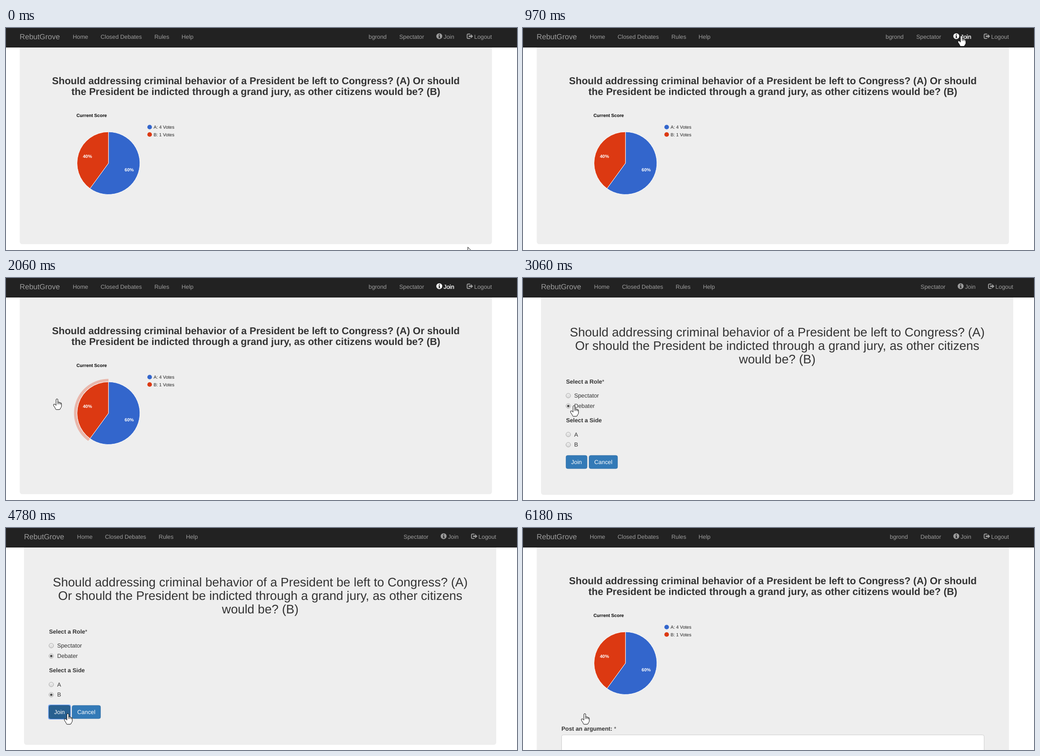
These frames come from a looping animation (1133 px wide and 494 px high, 7.11 s). An HTML page:

```html
<!DOCTYPE html>
<html lang="en">
<head>
<meta charset="utf-8">
<title>Debate</title>
<style>
  html, body { margin: 0; width: 100%; height: 100%; overflow: hidden; background: #fff; }
  svg { display: block; width: 100%; height: 100%; }
  text { font: 12.85px "Liberation Sans", Arial, sans-serif; fill: #333; text-rendering: geometricPrecision; }
  .bold { font-weight: bold; }
  .middle { text-anchor: middle; }
  .end { text-anchor: end; }
  #nav text { fill: #9d9d9d; }
  #nav .brand { font-size: 16.52px; }
  #join { color: #9d9d9d; }
  #join.lit { color: #fff; }
  #nav #join text { fill: currentColor; }
  #nav #join.lit text { stroke: #fff; stroke-width: .4px; }
  .question { font-size: 22.03px; font-weight: bold; }
  .prompt { font-size: 27.54px; }
  .chart text { font-size: 10.12px; fill: #222; }
  .chart .title { font-weight: bold; fill: #000; }
  .chart .share { font-weight: bold; fill: #fff; }
  .slice { stroke: #fff; stroke-width: 1; }
  .radio circle:first-child { fill: url(#shade); stroke: #a0a0a0; stroke-width: .9; }
  .radio.hover circle:first-child { stroke: #858585; }
  .radio .dot { fill: #4a4a4a; stroke: none; }
  .button { fill: #337ab7; stroke: #2e6da4; stroke-width: .92; }
  .caption { fill: #fff; text-anchor: middle; }
  #hand, #arrow { fill: #fff; stroke: #000; stroke-width: 1; stroke-linejoin: round; stroke-linecap: round; }
</style>
</head>
<body>
<svg viewBox="0 0 1133 494">
  <defs>
    <linearGradient id="shade" x2="0" y2="1">
      <stop stop-color="#f0f0f0"/><stop offset="1" stop-color="#d8d8d8"/>
    </linearGradient>
  </defs>
  <rect width="1133" height="494" fill="#fff"/>
  <rect id="panel" y="20" width="1047" rx="5.5" fill="#eee"/>
  <rect width="1133" height="43" fill="#222"/>
  <rect y="42.3" width="1133" height="1" fill="#080808"/>

  <g id="nav">
    <text class="brand" x="30.3" y="25.3">RebutGrove</text>
    <text x="148" y="24.1">Home</text>
    <text x="209.8" y="24.1">Closed Debates</text>
    <text x="329" y="24.1">Rules</text>
    <text x="389.3" y="24.1">Help</text>
    <text id="user" class="end" y="24.1">bgrond</text>
    <text id="role" class="end" x="927" y="24.1"></text>
    <g id="join">
      <circle cx="960.7" cy="18.2" r="6.5" fill="currentColor"/>
      <path d="M959.7 13.8h2.2v2h-2.2zM958.8 16.9h3.2v4h1v1.4h-4.2v-1.4h1v-2.6h-1z" fill="#222"/>
      <text x="970.3" y="24.1">Join</text>
    </g>
    <path d="M1029 13.5h-4.5q-2 0-2 2v5.8q0 2 2 2h4.5" fill="none" stroke="#9d9d9d" stroke-width="1.9"/>
    <path d="M1026 16.8h4.6v-3.2l5 4.8-5 4.8V20H1026z" fill="#9d9d9d"/>
    <text x="1038" y="24.1">Logout</text>
  </g>

  <g id="score">
    <text class="question middle" x="554" y="125">Should addressing criminal behavior of a President be left to Congress? (A) Or should</text>
    <text class="question middle" x="554" y="149">the President be indicted through a grand jury, as other citizens would be? (B)</text>
    <g class="chart">
      <text class="title" x="156.3" y="197.5">Current Score</text>
      <circle cx="318.5" cy="220.5" r="5.1" fill="#3366cc"/>
      <text x="327.2" y="224.2">A: 4 Votes</text>
      <circle cx="318.5" cy="237" r="5.1" fill="#dc3912"/>
      <text x="327.2" y="240.6">B: 1 Votes</text>
      <path id="glow" fill="none" stroke="#dc3912" stroke-opacity=".3" stroke-width="6"/>
      <path id="sliceA" class="slice" fill="#3366cc"/>
      <path id="sliceB" class="slice" fill="#dc3912"/>
      <text class="share middle" x="180.6" y="289.3">40%</text>
      <text class="share middle" x="273.2" y="319">60%</text>
    </g>
    <g id="post">
      <text x="85.3" y="450.6"><tspan class="bold">Post an argument:</tspan> *</text>
      <rect x="85.6" y="460.4" width="936.8" height="60" rx="3.7" fill="#fff" stroke="#ccc"/>
    </g>
  </g>

  <g id="form">
    <text class="prompt middle" x="563.7" y="130">Should addressing criminal behavior of a President be left to Congress? (A)</text>
    <text class="prompt middle" x="563.7" y="160">Or should the President be indicted through a grand jury, as other citizens</text>
    <text class="prompt middle" x="563.7" y="190">would be? (B)</text>
    <text x="95.4" y="234.6"><tspan class="bold">Select a Role</tspan>*</text>
    <text class="bold" x="95.4" y="321.3">Select a Side</text>
    <g id="options"></g>
    <rect id="ring" x="94.6" y="394.1" width="48" height="30.8" rx="3" fill="none" stroke="#6ba3f5" stroke-width="2.2"/>
    <rect id="submit" class="button" x="95.4" y="394.9" width="46.6" height="29.2" rx="3.5"/>
    <text class="caption" x="118.6" y="413.8">Join</text>
    <rect class="button" x="146.6" y="394.9" width="63" height="29.2" rx="3.5"/>
    <text class="caption" x="178.1" y="413.8">Cancel</text>
  </g>

  <path id="arrow" d="M0 0V16.5L3.8 13L6.3 18.8L9 17.6L6.5 12H11.5Z"/>
  <path id="hand" d="M-2 14V2Q-2 0 0 0T2 2V7.5Q3.6 6 5 8Q6.8 6.8 8 9Q10 8.4 10 11V16.5Q10 18.5 7.8 20.8Q7.4 23.8 5 23.8H-1.5Q-3 23.8-3.4 21.5Q-4.6 19-7 15.8Q-8.6 13-7 11.8Q-5 10.9-2 14M2 7.5V11.5M5 8V11.5M8 9.2V12"/>
</svg>

<script>
const LOOP = 7110, FORM_OPEN = 2130, FORM_SENT = 6010;
const $ = id => document.getElementById(id);
const show = (id, on) => { $(id).style.display = on ? '' : 'none'; };

const rim = (turn, r) => {
  const a = turn * 2 * Math.PI;
  return `${227.2 + r * Math.sin(a)} ${300.8 - r * Math.cos(a)}`;
};
const arc = (from, to, r) => `M${rim(from, r)}A${r} ${r} 0 ${+(to - from > .5)} 1 ${rim(to, r)}`;
const slice = (from, to) => arc(from, to, 69.7) + 'L227.2 300.8Z';
$('sliceA').setAttribute('d', slice(0, .6));
$('sliceB').setAttribute('d', slice(.6, 1));
$('glow').setAttribute('d', arc(.6, 1, 73.4));

$('options').innerHTML = [['Spectator', 261.8], ['Debater', 284.8], ['A', 348.2], ['B', 371]].map(([label, y]) =>
  `<g class="radio" id="pick${label}"><circle cx="100.4" cy="${y}" r="5.1"/>
   <circle class="dot" id="dot${label}" cx="100.4" cy="${y}" r="2.6"/></g>
   <text x="113.4" y="${y + 4.4}">${label}</text>`).join('');
show('dotSpectator', false);
show('dotA', false);

// Pointer strokes: start, end, points (two, or three for a curve), optional pace
const moves = [
  [0, 650, [[1024, 488], [972, 17]]],
  [970, 2060, [[972, 17], [500, 240], [113, 269]], .8],
  [2650, 2890, [[113, 269], [113, 284]]],
  [3060, 3520, [[113, 284], [111, 368]]],
  [3950, 4120, [[111, 368], [108, 378]]],
  [4120, 4310, [[108, 378], [137, 413]]],
];
const mix = (a, b, s) => a.map((v, i) => v + (b[i] - v) * s);

function pointerAt(t) {
  const [start, end, points, pace = 1] = moves.findLast(m => t >= m[0]);
  const u = Math.min(1, (t - start) / (end - start)) ** pace;
  const s = u * u * (3 - 2 * u);
  let p = points;
  while (p.length > 1) p = p.slice(1).map((q, i) => mix(p[i], q, s));
  return p[0];
}

function draw(t) {
  const form = t >= FORM_OPEN && t < FORM_SENT, debater = t >= FORM_SENT;
  const [x, y] = pointerAt(t);
  const glow = t >= 1590 && t < FORM_OPEN;

  show('form', form);
  show('score', !form);
  show('post', debater);
  show('glow', glow);
  show('user', !form);
  $('nav').setAttribute('transform', `translate(${form ? 9.6 : 0})`);
  $('panel').setAttribute('x', form ? 40 : 30.5);
  $('panel').setAttribute('height', debater ? 520 : form ? 462.5 : 461);
  $('user').setAttribute('x', debater ? 853.3 : 844);
  $('role').textContent = debater ? 'Debator' : 'Spectator';
  $('join').classList.toggle('lit', t < FORM_OPEN && (y < 43 || t >= 970));

  $('pickSpectator').classList.toggle('hover', y < 272);
  show('dotDebater', t >= 2890);
  show('dotB', t >= 3950);
  const pressed = t >= 4640 && t < 4780;
  $('submit').style.fill = pressed ? '#204d74' : y > 395 ? '#286090' : '';
  $('submit').style.stroke = y > 395 ? '#204d74' : '';
  show('ring', t >= 4640);

  const hand = debater || (form ? y < 295 || y > 338 : y < 43 || glow);
  show('hand', hand);
  show('arrow', !hand);
  $(hand ? 'hand' : 'arrow').setAttribute('transform', `translate(${x} ${y})`);
}

const began = performance.now();
function tick() {
  draw((performance.now() - began) % LOOP);
  requestAnimationFrame(tick);
}
tick();
</script>
</body>
</html>
```
